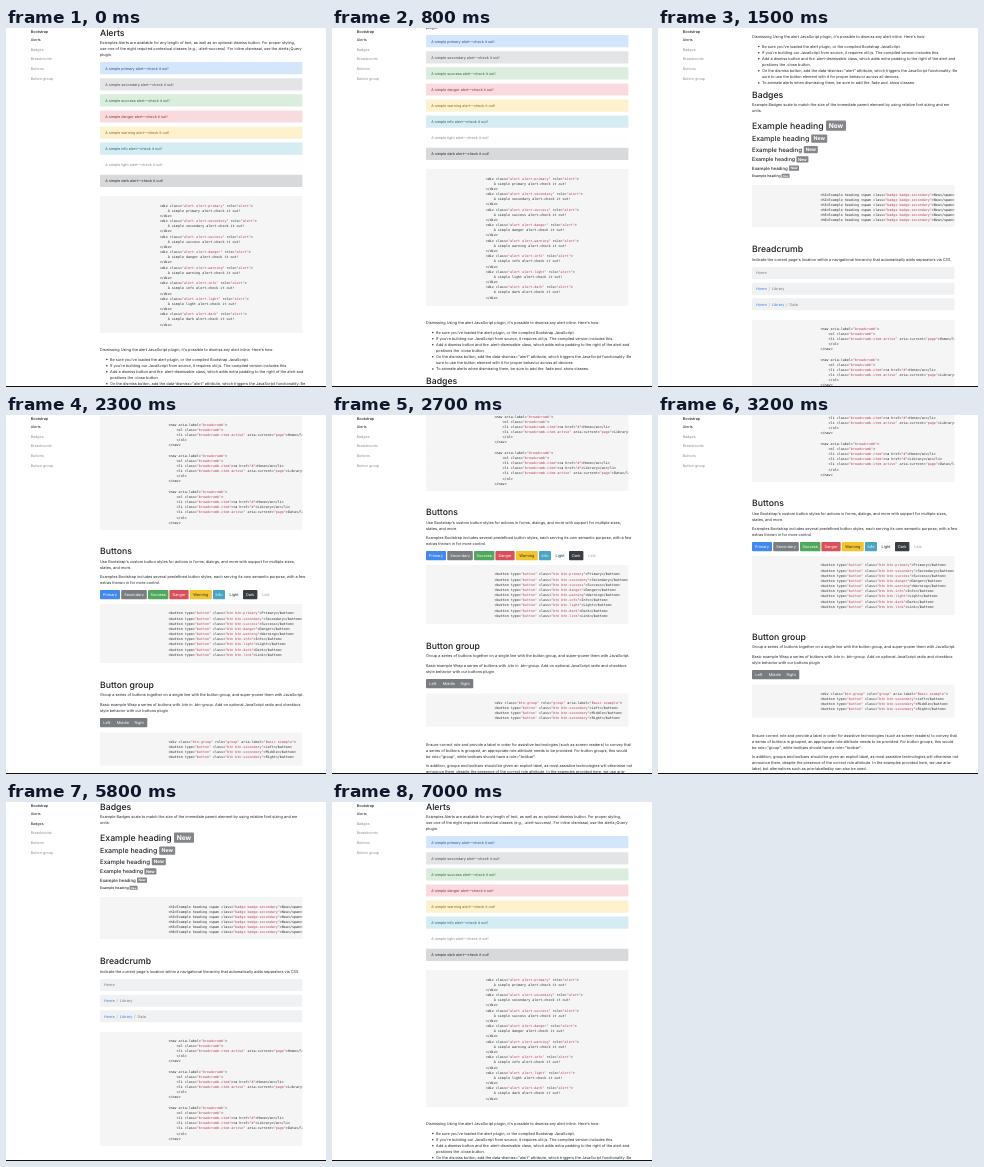
These frames come from a looping animation (320x359 px, 8000 ms). An HTML page:

```html
<!DOCTYPE html>
<html lang="en">
<head>
<meta charset="utf-8">
<title>Component docs</title>
<style>
  html, body { margin: 0; width: 100%; height: 100%; overflow: hidden; background: #fff; }
  svg { display: block; }
  #stage { width: 100%; height: 100%; }
  text { font-family: Inter, "Open Sans", sans-serif; font-size: 3.83px; fill: #202428; white-space: pre; text-rendering: geometricPrecision; }
  .title { font-size: 8.7px; font-weight: 500; fill: #16191c; }
  .code { font-family: "DejaVu Sans Mono", "Liberation Mono", monospace; font-size: 3.37px; fill: #2a2b2d; }
  .tag { fill: #17181c; }
  .str { fill: #b23a52; }
  .nav { font-size: 3.65px; fill: #8f8f8f; }
  .nav.on { fill: #202327; }
  .mid { text-anchor: middle; }
</style>
</head>
<body>
<svg id="stage" viewBox="0 0 320 359">
  <g id="page"></g>
  <g id="side"></g>
  <rect y="358" width="320" height="1" fill="#111"/>
</svg>
<script>
const LEFT = 94, WIDTH = 202.4, CODE_STEP = 5.17;
const out = [];
const esc = s => s.replace(/&/g, '&amp;').replace(/</g, '&lt;').replace(/>/g, '&gt;');
const cap = s => s[0].toUpperCase() + s.slice(1);

// y is the middle of the capitals
function textAt(x, y, content, { size = 3.83, cls = '', style = '' } = {}) {
  return `<text x="${x}" y="${y + size * 0.36}" class="${cls}" style="font-size:${size}px;${style}">${content}</text>`;
}
const put = (x, y, s, opts) => out.push(textAt(x, y, esc(s), opts));
const title = (y, s) => put(LEFT, y + 0.2, s, { size: 8.7, cls: 'title' });
const para = (y, lines, x = LEFT) => lines.forEach((s, i) => put(x, y + i * 6.05, s));
const box = (x, y, w, h, fill, r = 0.9) =>
  out.push(`<rect x="${x}" y="${y}" width="${w}" height="${h}" rx="${r}" fill="${fill}"/>`);

function highlight(line) {
  return line.split(/("[^"]*"|<\/?\w+|>)/).map(part => {
    const cls = part[0] === '"' ? 'str' : /^[<>]/.test(part) ? 'tag' : '';
    return cls ? `<tspan class="${cls}">${esc(part)}</tspan>` : esc(part);
  }).join('');
}

function codeBlock(top, bottom, x, first, lines) {
  box(LEFT, top, WIDTH, bottom - top, '#f5f5f5', 0);
  out.push(`<svg x="${LEFT}" y="${top}" width="${WIDTH}" height="${bottom - top}">`);
  lines.forEach((line, i) => out.push(
    textAt(x - LEFT, first - top + i * CODE_STEP, highlight(line), { size: 3.37, cls: 'code' })));
  out.push('</svg>');
}

// Alerts
title(5, 'Alerts');
para(14.7, [
  'Examples Alerts are available for any length of text, as well as an optional dismiss button. For proper styling,',
  'use one of the eight required contextual classes (e.g., .alert-success). For inline dismissal, use the alerts jQuery',
  'plugin.']);
const alerts = [
  ['primary', '#d3e6fb', '#2c5788'], ['secondary', '#e3e4e6', '#4b4f54'],
  ['success', '#dbeedd', '#2f6a3e'], ['danger', '#f9dbdf', '#80343c'],
  ['warning', '#fdf1ce', '#866b24'], ['info', '#d6ecf3', '#28606e'],
  ['light', '#fefefe', '#8b8c8e'], ['dark', '#d8d9da', '#2a2c2f']];
alerts.forEach(([name, bg, ink], i) => {
  const y = 40.2 + i * 16.1;
  box(LEFT, y - 6.1, WIDTH, 12.2, bg);
  put(99.3, y, `A simple ${name} alert—check it out!`, { size: 3.7, style: `fill:${ink}` });
});
codeBlock(168, 305, 153.7, 177.4, alerts.flatMap(([name]) => [
  `<div class="alert alert-${name}" role="alert">`,
  `    A simple ${name} alert-check it out!`,
  '</div>']));
para(322, ["Dismissing Using the alert JavaScript plugin, it's possible to dismiss any alert inline. Here's how:"]);
para(331.3, [
  "Be sure you've loaded the alert plugin, or the compiled Bootstrap JavaScript.",
  "If you're building our JavaScript from source, it requires util.js. The compiled version includes this.",
  'Add a dismiss button and the .alert-dismissible class, which adds extra padding to the right of the alert and',
  'positions the .close button.',
  'On the dismiss button, add the data-dismiss="alert" attribute, which triggers the JavaScript functionality. Be',
  'sure to use the button element with it for proper behavior across all devices.',
  'To animate alerts when dismissing them, be sure to add the .fade and .show classes.'], 104);
[0, 1, 2, 4, 6].forEach(i =>
  out.push(`<circle cx="100.8" cy="${331.6 + i * 6.05}" r=".75" fill="#202428"/>`));

// Badges
title(380, 'Badges');
para(390, [
  'Example Badges scale to match the size of the immediate parent element by using relative font sizing and em',
  'units.']);
[[40, 410.5], [32, 423.5], [28, 434.5], [24, 444.2], [20, 453], [16, 460.7]].forEach(([size, y]) => {
  const u = size / 40, x = LEFT + 74 * u;
  put(LEFT, y, 'Example heading', { size: 8.75 * u, style: 'font-weight:500' });
  box(x, y - 5.1 * u, 20 * u, 10.4 * u, '#84868a', 1 * u);
  put(x + 10 * u, y, 'New', { size: 6.6 * u, cls: 'mid', style: 'font-weight:700;fill:#fff' });
});
codeBlock(470, 512, 162.5, 479.3, [1, 2, 3, 4, 5, 6].map(n =>
  `<h${n}>Example heading <span class="badge badge-secondary">New</span></h${n}>`));

// Breadcrumb
title(534, 'Breadcrumb');
para(545, ["Indicate the current page's location within a navigational hierarchy that automatically adds separators via CSS."]);
const trail = ['Home', 'Library', 'Data'];
trail.forEach((_, n) => {
  const y = 558.1 + n * 15.6;
  box(LEFT, y - 6, WIDTH, 12, '#f0f1f2');
  const parts = trail.slice(0, n + 1).map((name, i) =>
    (i ? '<tspan dx="1.9" fill="#83898f">/</tspan>' : '') +
    `<tspan dx="${i ? 1.9 : 0}" fill="${i < n ? '#3a82e8' : '#747a80'}">${name}</tspan>`);
  out.push(textAt(97.9, y, parts.join('')));
});
codeBlock(605, 719, 162.5, 613.3, trail.flatMap((_, n) => [
  ...(n ? [''] : []),
  '<nav aria-label="breadcrumb">',
  '    <ol class="breadcrumb">',
  ...trail.slice(0, n).map(name => `    <li class="breadcrumb-item"><a href="#">${name}</a></li>`),
  `    <li class="breadcrumb-item active" aria-current="page">${trail[n]}</li>`,
  '    </ol>',
  '</nav>']));

// Buttons
title(740, 'Buttons');
para(751, [
  "Use Bootstrap's custom button styles for actions in forms, dialogs, and more with support for multiple sizes,",
  'states, and more.']);
para(766, [
  'Examples Bootstrap includes several predefined button styles, each serving its own semantic purpose, with a few',
  'extras thrown in for more control.']);
const buttons = [
  ['primary', 94, 20, '#4189ee', '#fff'], ['secondary', 115.2, 25.6, '#7a7e83', '#fff'],
  ['success', 142, 20.4, '#50a95b', '#fff'], ['danger', 163.4, 19.2, '#d9505a', '#fff'],
  ['warning', 183.8, 22, '#f2c530', '#2b2f33'], ['info', 207, 12, '#4aa6c0', '#fff'],
  ['light', 220.4, 15.4, '#f9fafa', '#2b2f33'], ['dark', 237, 14.4, '#3a3d42', '#fff'],
  ['link', 253, 14, 'none', '#8a96ac']];
buttons.forEach(([name, x, w, bg, ink]) => {
  box(x, 779, w, 9.2, bg);
  put(x + w / 2, 783.7, cap(name), { cls: 'mid', style: `fill:${ink}` });
});
codeBlock(793, 852, 162.5, 802.2, buttons.map(([name]) =>
  `<button type="button" class="btn btn-${name}">${cap(name)}</button>`));

// Button group
title(874, 'Button group');
para(884, ['Group a series of buttons together on a single line with the button group, and super-power them with JavaScript.']);
para(894, [
  'Basic example Wrap a series of buttons with .btn in .btn-group. Add on optional JavaScript radio and checkbox',
  'style behavior with our buttons plugin']);
box(LEFT, 907, 47.3, 9.2, '#797c80');
const sides = ['Left', 'Middle', 'Right'];
sides.forEach((name, i) =>
  put([100.7, 116.8, 133.2][i], 911.7, name, { cls: 'mid', style: 'fill:#fff' }));
codeBlock(921.5, 954.7, 162.5, 930.7, [
  '<div class="btn-group" role="group" aria-label="Basic example">',
  ...sides.map(name => `<button type="button" class="btn btn-secondary">${name}</button>`)]);
para(973, [
  'Ensure correct role and provide a label in order for assistive technologies (such as screen readers) to convey that',
  'a series of buttons is grouped, an appropriate role attribute needs to be provided. For button groups, this would',
  'be role="group", while toolbars should have a role="toolbar".']);
para(993.7, [
  'In addition, groups and toolbars should be given an explicit label, as most assistive technologies will otherwise not',
  'announce them, despite the presence of the correct role attribute. In the examples provided here, we use aria-',
  'label, but alternatives such as aria-labelledby can also be used.']);

const page = document.getElementById('page');
page.innerHTML = out.join('');

// Sidebar
const side = document.getElementById('side');
side.innerHTML = textAt(24.7, 3.2, 'Bootstrap', { size: 3.75, style: 'font-weight:500' }) +
  ['Alerts', 'Badges', 'Breadcrumb', 'Buttons', 'Button group'].map((name, i) =>
    textAt(24.7, 11.7 + i * 9.63, name, { size: 3.65, cls: 'nav' })).join('');
const links = side.querySelectorAll('.nav');

// Wheel scroll: time, offset, speed
const path = [[400, 0, 0], [800, 27, 0.2], [1500, 313, 0.48], [2300, 604, 0.15], [3200, 652, 0]];
// Link clicks: time, offset
const jumps = [[5000, 529], [5600, 375], [6800, 0]];
// Highlighted link: time, index
const hovers = [[0, 0], [3900, 3], [5000, 2], [5500, 1], [6800, 0]];

const latest = (list, t) => list.filter(([at]) => at <= t).pop();

function scrollAt(t) {
  const jump = latest(jumps, t);
  if (jump) return jump[1];
  if (t <= path[0][0]) return 0;
  const i = path.findIndex(([at]) => t <= at);
  if (i < 0) return path[path.length - 1][1];
  const [t0, y0, v0] = path[i - 1], [t1, y1, v1] = path[i];
  const d = t1 - t0, s = (t - t0) / d, r = 1 - s;
  return r * r * ((1 + 2 * s) * y0 + s * d * v0) + s * s * ((3 - 2 * s) * y1 - r * d * v1);
}

function draw() {
  const t = Math.floor(performance.now() % 8000 / 100) * 100;
  page.setAttribute('transform', `translate(0 ${-Math.round(scrollAt(t))})`);
  const hover = latest(hovers, t)[1];
  links.forEach((link, i) => link.classList.toggle('on', i === 0 || i === hover));
  requestAnimationFrame(draw);
}
draw();
</script>
</body>
</html>
```
